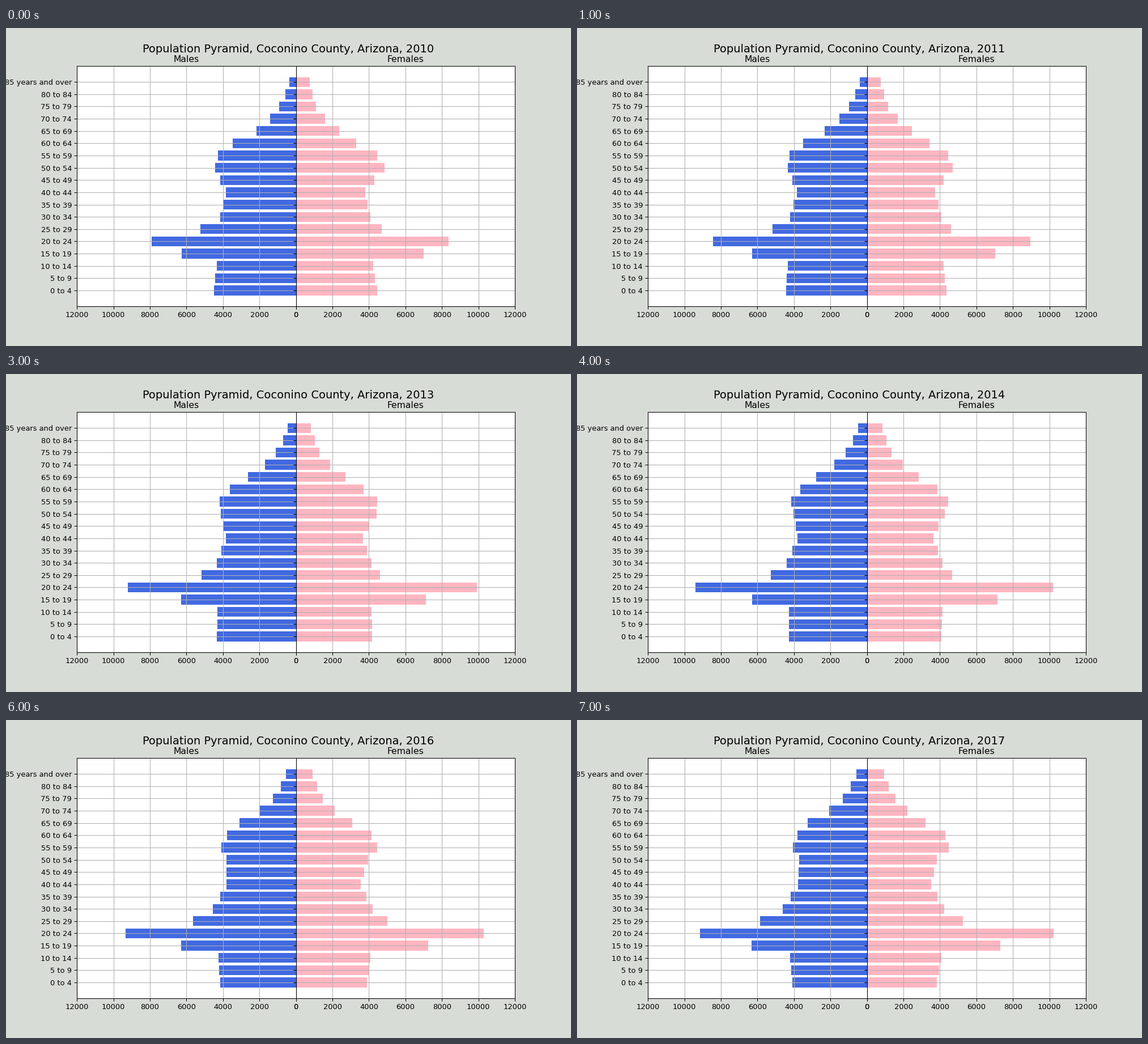
A matplotlib script that plays this animation: 997 by 561 pixels, repeating every 8 s.

```python
import numpy as np
import matplotlib.pyplot as plt
from matplotlib.animation import FuncAnimation

W, H, DPI = 997, 561, 93.5
LIMIT = 12000
FIRST, LAST = 2010, 2017
AGES = [f"{a} to {a + 4}" for a in range(0, 85, 5)] + ["85 years and over"]
ROWS = np.arange(len(AGES))

# Key counts at a few age rows, for the first and the last year.
KEY_ROWS = [0, 2, 3, 4, 5, 6, 8, 10, 11, 12, 13, 15, 17]
MALES = (
    [4500, 4350, 6270, 7920, 5220, 4160, 3850, 4440, 4260, 3450, 2170, 930, 370],
    [4100, 4220, 6310, 9160, 5870, 4600, 3790, 3700, 4040, 3820, 3260, 1320, 590],
)
FEMALES = (
    [4440, 4220, 6990, 8360, 4690, 4070, 3790, 4850, 4440, 3290, 2360, 1090, 745],
    [3820, 4070, 7300, 10220, 5250, 4220, 3510, 3820, 4470, 4290, 3200, 1550, 930],
)
# Mid-period rise at ages 20 to 24 and dip at 25 to 29.
SWELL = 780 * (ROWS == 4) - 340 * (ROWS == 5)


def profile(counts):
    """Geometric interpolation of the key counts over all age rows."""
    return np.exp(np.interp(ROWS, KEY_ROWS, np.log(counts)))


def population(keys, year):
    t = (year - FIRST) / (LAST - FIRST)
    start, end = map(profile, keys)
    return start + (end - start) * t + SWELL * np.sin(np.pi * t)


def make_side(ax, name, color, limits):
    bars = ax.barh(ROWS, 0 * ROWS, color=color)
    ax.set_xlim(*limits)
    ax.set_ylim(-1.29, len(AGES) + 0.29)
    ax.set_xticks(range(0, LIMIT + 1, 2000))
    ax.set_yticks(ROWS, AGES)
    ax.set_title(name, fontsize=12)
    ax.grid(True)
    return bars


plt.rcParams["font.family"] = "DejaVu Sans"
fig, (left, right) = plt.subplots(
    1, 2, figsize=(W / DPI, H / DPI), dpi=DPI, facecolor="#d8dcd6")
fig.subplots_adjust(left=0.1255, right=0.9008, bottom=0.125, top=0.88, wspace=0)
title = fig.suptitle("", fontsize=15, y=0.95)

male_bars = make_side(left, "Males", "royalblue", (LIMIT, 0))
female_bars = make_side(right, "Females", "lightpink", (0, LIMIT))
right.tick_params(axis="y", labelleft=False)


def update(i):
    year = FIRST + i
    title.set_text(f"Population Pyramid, Coconino County, Arizona, {year}")
    for bars, keys in ((male_bars, MALES), (female_bars, FEMALES)):
        for bar, count in zip(bars, population(keys, year)):
            bar.set_width(count)
    return [title, *male_bars, *female_bars]


anim = FuncAnimation(fig, update, frames=LAST - FIRST + 1, interval=1000,
                     repeat=True, repeat_delay=0)
plt.show()
```
